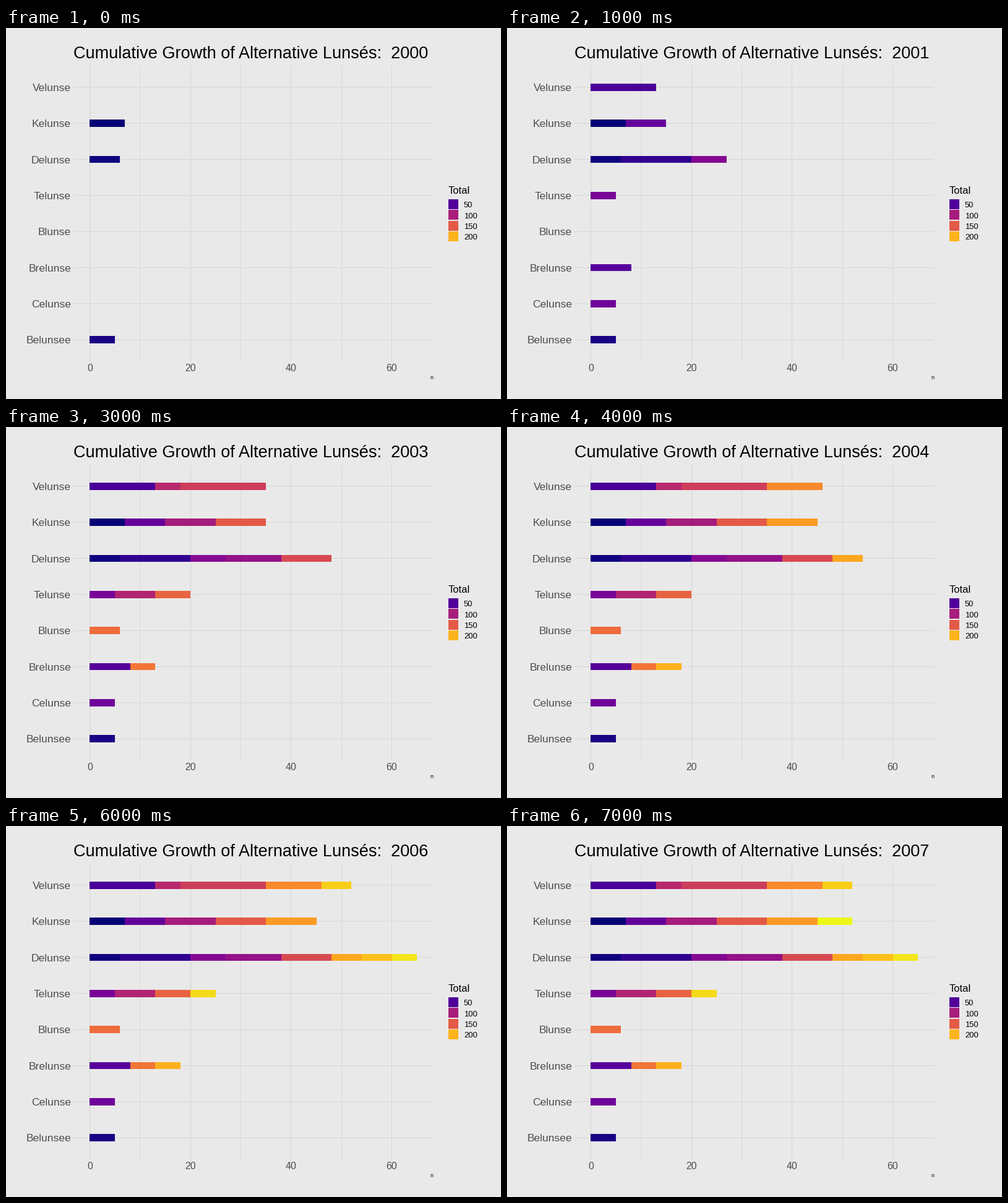
Write a matplotlib script that moves like this. It is 800 px wide and 600 px high and loops after 8 s.

```python
import math
import numpy as np
import matplotlib.pyplot as plt
from matplotlib.animation import FuncAnimation
from matplotlib.patches import Rectangle

W, H, DPI = 800, 600, 100
X0, UNIT = 135.45, 8.135
TOP, STEP, HALF = 95.78, 58.35, 5.84
START = 2000

NAMES = ["Velunse", "Kelunse", "Delunse", "Telunse",
         "Blunse", "Brelunse", "Celunse", "Belunsee"]
V, K, D, T, B, R, C, E = range(8)

# Births added each year as (row, count), in order of the running total
YEARS = [
    [(K, 7), (D, 6), (E, 5)],
    [(D, 14), (V, 13), (R, 8), (K, 8), (C, 5), (T, 5), (D, 7)],
    [(D, 11), (K, 10), (T, 8), (V, 5)],
    [(V, 17), (D, 10), (K, 10), (T, 7), (B, 6), (R, 5)],
    [(V, 11), (K, 10), (D, 6), (R, 5)],
    [(D, 6), (V, 6), (T, 5)],
    [(D, 5)],
    [(K, 7)],
]
LOW = YEARS[0][0][1]
HIGH = sum(n for year in YEARS for _, n in year)

plt.rcParams["font.family"] = "Liberation Sans"
fig = plt.figure(figsize=(W / DPI, H / DPI), dpi=DPI, facecolor="#e9e9e9")
ax = fig.add_axes([0, 0, 1, 1])
ax.set_xlim(0, W)
ax.set_ylim(H, 0)
ax.axis("off")


def shade(total):
    rgb = np.array(plt.cm.plasma((total - LOW) / (HIGH - LOW))[:3])
    return rgb ** np.array([1.27, 1.3, 1.2])


def label(x, y, text, px, color="black", ha="left"):
    return ax.text(x, y, text, fontsize=px * 72 / DPI, color=color,
                   ha=ha, va="baseline")


def box(x1, y1, x2, y2, color):
    x1, y1, x2, y2 = (round(v) for v in (x1, y1, x2, y2))
    return ax.add_patch(Rectangle((x1, y1), x2 - x1, y2 - y1, fc=color,
                                  lw=0, antialiased=False, zorder=3))


def grid(xs, ys, color, snap):
    ax.plot(xs, ys, color=color, lw=0.72, zorder=1, snap=snap,
            solid_capstyle="butt")


def draw_axes():
    for value in range(0, 61, 10):
        x = X0 + value * UNIT
        column = math.floor(x)
        major = value % 20 == 0
        grid([column, column], [61, 539],
             "#d5d5d5" if major else "#dadada", True)
        if major:
            label(x, 555, str(value), 16, "#4d4d4d", "center")
    for row, name in enumerate(NAMES):
        y = TOP + row * STEP
        grid([109, 690], [y, y], "#d5d5d5", False)
        label(105, y + 6.2, name, 17.5, "#4d4d4d", "right")
    label(690.5, 568, "n", 9, ha="right")


def draw_legend():
    label(714.5, 268, "Total", 16.5)
    for i, total in enumerate((50, 100, 150, 200)):
        y = 277 + i * 17.3
        box(715, y, 731, y + 16, shade(total))
        label(740, y + 13.2, str(total), 13)


def draw_bars():
    bars, total, ends = [], 0, [0] * len(NAMES)
    for index, year in enumerate(YEARS):
        for row, count in year:
            total += count
            y = TOP + row * STEP
            left = X0 + ends[row] * UNIT
            ends[row] += count
            bar = box(left, y - HALF, X0 + ends[row] * UNIT, y + HALF,
                      shade(total))
            bars.append((index, bar))
    return bars


draw_axes()
draw_legend()
bars = draw_bars()
title = label(109, 49, "", 27.1)


def update(i):
    title.set_text(f"Cumulative Growth of Alternative Lunsés:  {START + i}")
    for index, bar in bars:
        bar.set_visible(index <= i)
    return [title] + [bar for _, bar in bars]


anim = FuncAnimation(fig, update, frames=len(YEARS), interval=1000,
                     repeat=True, repeat_delay=0, blit=False)
plt.show()
```
